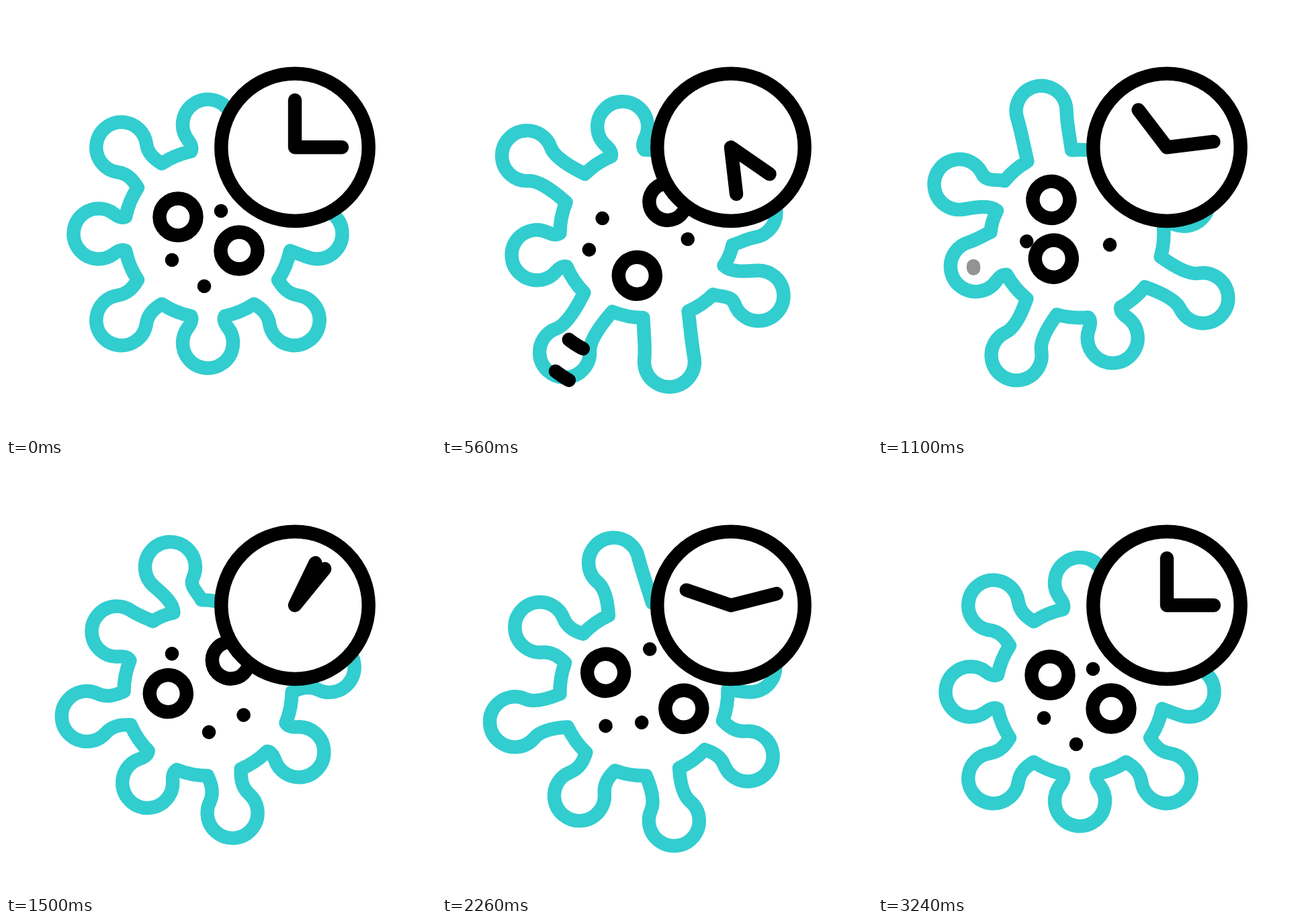
Recreate the animation shown at these times as an HTML page with a canvas. Size 640x640 px, loop 3600 ms.

```html
<!DOCTYPE html>
<html lang="en">
<head>
<meta charset="utf-8">
<title>Virus and clock</title>
<style>
  html, body { margin: 0; height: 100%; overflow: hidden; background: #fff; }
  canvas { display: block; width: 100vmin; height: 100vmin; }
</style>
</head>
<body>
<canvas id="stage" width="640" height="640"></canvas>
<script>
const ctx = document.getElementById('stage').getContext('2d');
const LOOP = 3600, STEP = 20, HALF = 1620;
const TEAL = '#32cdcf', BLACK = '#000';
const BULB = 37.5;
const rad = deg => deg * Math.PI / 180;
const clamp = x => Math.min(1, Math.max(0, x));
const smooth = x => x * x * (3 - 2 * x);
const polar = (r, deg) => [r * Math.cos(rad(deg)), r * Math.sin(rad(deg))];

// Cubic bezier timing (1/3, 0, 0, 1): quick start, long settling.
function ease(x) {
  x = clamp(x);
  let lo = 0, hi = 1;
  for (let i = 0; i < 30; i++) {
    const s = (lo + hi) / 2;
    if ((1 - s) * (1 - s) * s + s * s * s < x) lo = s; else hi = s;
  }
  return smooth(lo);
}

// Eight arms clockwise from the top, alternately short and long.
// Long arms stretch in the first half of the turn, short ones in the second.
const shape = (base, radius, meet) => ({ base, radius, meet });
const NECK = shape(11.7, 125, 37), WIDE = shape(18.5, 133, 0);
const arms = Array.from({ length: 8 }, (_, i) => {
  const long = i % 2 === 1, late = !long && i !== 2;
  return { len: long ? 182 : 162.5, late, grow: late ? 39 : 45 - 2 * i, lean: 0, ccw: NECK, cw: NECK };
});
// The three arms that start near the clock are less regular.
arms[0].cw = WIDE;
Object.assign(arms[1], { len: 193, grow: 0, lean: -18, ccw: shape(12, 128, 37), cw: shape(7.5, 137, 37) });
Object.assign(arms[2], { ccw: WIDE, cw: shape(11.7, 125, 18) });

// Eyes and dots leave home, pass three stops and return while the body turns.
const times = [0, 780, 1100, 1940, 3240];
const eyes = [
  [[-44.5, -25], [-36, -51.6], [-23.7, -48.5], [-47.5, -46]],
  [[46.5, 25], [64, 15], [61, -25.5], [54.5, 35.4]]
];
const dots = [
  [[19.5, -34], [20, -75], [13, -79], [23, -69]],
  [[-53.5, 39], [-27, 60], [-29, 37.6], [-67, 36]],
  [[-5.5, 78], [13, 88], [15, 92], [-13, 39]]
];

// Smooth path through the stops, at rest at both ends.
function along([home, ...stops], t) {
  const p = [home, ...stops, home], last = p.length - 1;
  if (t >= times[last]) return home;
  const i = times.findLastIndex(s => s <= t);
  const span = times[i + 1] - times[i], x = (t - times[i]) / span, s = smooth(x);
  const slope = (k, a) => k === 0 || k === last ? 0
    : (p[k + 1][a] - p[k - 1][a]) / (times[k + 1] - times[k - 1]) * span;
  return [0, 1].map(a => p[i][a] * (1 - s) + p[i + 1][a] * s
    + slope(i, a) * x * (1 - x) ** 2 - slope(i + 1, a) * x * x * (1 - x));
}

// Curve of one arm side from base to bulb; dir is -1 (ccw) or 1 (cw).
function side({ base, radius, meet }, len, lean, dir) {
  const b = polar(radius, dir * base), [c, s] = polar(1, meet);
  const end = [len - BULB * s, lean + dir * BULB * c];
  const gap = end[0] - b[0], pull = Math.min(gap * 0.4, 16);
  const c1 = [b[0] + gap / 3, meet > 30 ? b[1] - dir * 3 : b[1] + (end[1] - b[1]) / 3];
  const c2 = [end[0] - pull * c, end[1] - dir * pull * s];
  return { b, c1, c2, end, meet: rad(meet) };
}

function virusPath(t) {
  ctx.beginPath();
  arms.forEach((a, i) => {
    const x = clamp((t - (a.late ? HALF : 0)) / HALF);
    const len = a.len + a.grow * smooth(1 - Math.abs(2 * x - 1));
    const l = side(a.ccw, len, a.lean, -1), r = side(a.cw, len, a.lean, 1);
    const next = arms[(i + 1) % 8].ccw;
    ctx.save();
    ctx.rotate(rad(i * 45 - 90));
    ctx.lineTo(...l.b);
    ctx.bezierCurveTo(...l.c1, ...l.c2, ...l.end);
    ctx.arc(len, a.lean, BULB, -Math.PI / 2 - l.meet, Math.PI / 2 + r.meet);
    ctx.bezierCurveTo(...r.c2, ...r.c1, ...r.b);
    // Slightly bulging body wall up to the next arm.
    const bulge = polar((a.cw.radius + next.radius) / 2 * 1.018, (a.cw.base + 45 - next.base) / 2);
    ctx.quadraticCurveTo(...bulge, ...polar(next.radius, 45 - next.base));
    ctx.restore();
  });
  ctx.closePath();
}

function disc(x, y, r) {
  ctx.beginPath();
  ctx.arc(x, y, r, 0, 2 * Math.PI);
}

function drawVirus(t) {
  ctx.save();
  ctx.translate(300.5, 339);
  ctx.rotate(rad(360 * ease(t / 3205)));
  ctx.strokeStyle = TEAL;
  virusPath(t);
  ctx.stroke();
  ctx.strokeStyle = BLACK;
  for (const e of eyes) { disc(...along(e, t), 27.5); ctx.stroke(); }
  for (const d of dots) { disc(...along(d, t), 10.3); ctx.fill(); }
  ctx.restore();
}

// Speed line: a travelling piece of a quadratic curve, fading out at the end.
function swoosh(t, finish, p0, p1, p2) {
  if (t < 520 || t >= finish) return;
  const head = clamp((t - 500) / 332);
  const tail = 0.98 * smooth(clamp((t - 780) / (finish - 824)));
  ctx.globalAlpha = clamp((finish - t) / 104);
  ctx.beginPath();
  for (let i = 0; i <= 20; i++) {
    const s = tail + (head - tail) * i / 20, q = 1 - s;
    ctx.lineTo(...[0, 1].map(k => q * q * p0[k] + 2 * q * s * p1[k] + s * s * p2[k]));
  }
  ctx.stroke();
  ctx.globalAlpha = 1;
}

function drawClock(t) {
  const x = 430, y = 210.3, turn = 360 * ease((t - 160) / 3022);
  const tip = deg => {
    const [dx, dy] = polar(70, deg - 90);
    return [x + dx, y + dy];
  };
  disc(x, y, 109.7);
  ctx.fillStyle = '#fff';
  ctx.fill();
  ctx.stroke();
  ctx.beginPath();
  ctx.moveTo(...tip(5 * turn));
  ctx.lineTo(x, y);
  ctx.lineTo(...tip(90 + turn));
  ctx.stroke();
}

function draw(now) {
  const t = Math.floor(now % LOOP / STEP) * STEP;
  ctx.fillStyle = '#fff';
  ctx.fillRect(0, 0, 640, 640);
  ctx.fillStyle = ctx.strokeStyle = BLACK;
  ctx.lineWidth = 20.4;
  ctx.lineCap = ctx.lineJoin = 'round';
  drawVirus(t);
  swoosh(t, 1144, [210, 510], [146, 478], [142, 387]);
  swoosh(t, 1080, [189, 557], [131, 524], [101, 447]);
  drawClock(t);
}

let start;
function tick(now) {
  start ??= now;
  draw(now - start);
  requestAnimationFrame(tick);
}
draw(0);
requestAnimationFrame(tick);
</script>
</body>
</html>
```
